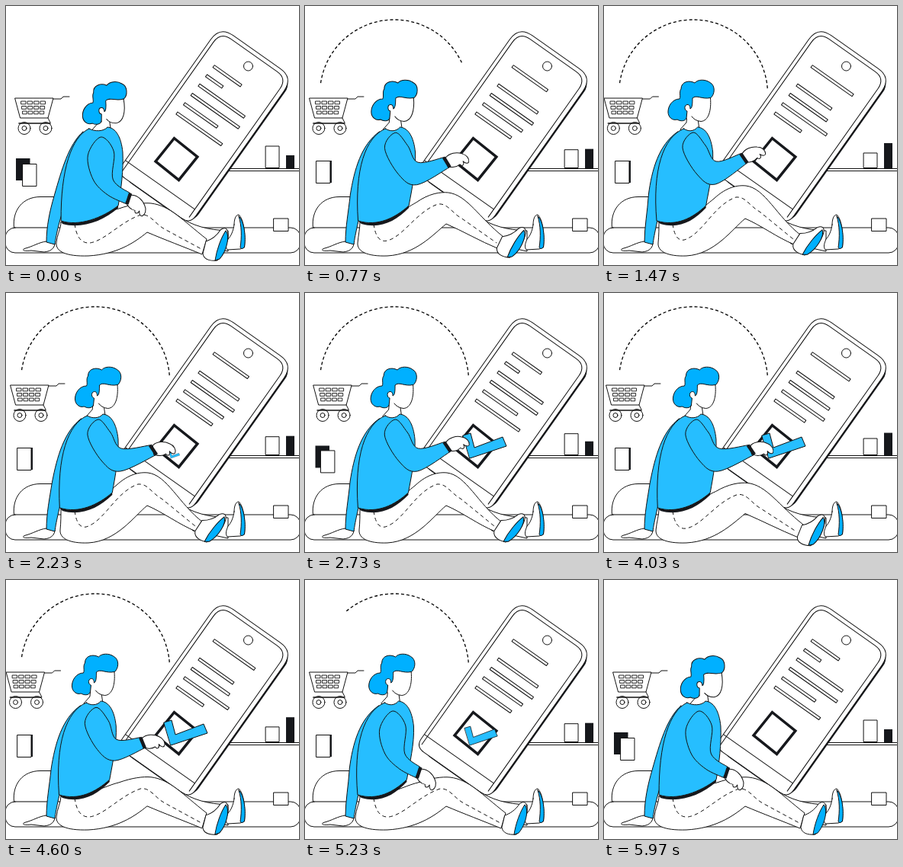
Write an HTML page that moves like this. It is 384 px wide and 340 px high and loops after 6000 ms.

```html
<!DOCTYPE html>
<html lang="en">
<head>
<meta charset="utf-8">
<title>Checklist on a phone</title>
<style>
  html, body { margin: 0; width: 100%; height: 100%; overflow: hidden; background: #fff; }
  svg { display: block; width: 384px; height: 340px; }
  .ln { fill: #fff; stroke: #111; stroke-width: 1; stroke-linejoin: round; stroke-linecap: round; }
  .open { fill: none; }
  .shirt { fill: #26beff; }
  .hair { fill: #00b0ff; }
  .dark { fill: #16181c; stroke: none; }
  .dash { fill: none; stroke-dasharray: 5 4; stroke-linecap: butt; }
  #arc { stroke: #000; stroke-width: 1.3; stroke-dasharray: 4 3; }
  #cells rect { stroke-width: .9; }
</style>
</head>
<body>
<svg viewBox="0 0 384 340">
  <path id="arc" class="ln dash"/>

  <g id="cart">
    <path class="ln" d="M0 121H50L43 147H7Z"/>
    <path class="ln open" d="M50 122H60L63 119H71M43 147L46 153"/>
    <g id="cells"></g>
    <g id="wheels"></g>
    <path class="ln open" d="M5 154H46" style="stroke-width:1.6"/>
  </g>

  <rect id="cardBack" class="dark" width="18.5" height="29"/>
  <rect id="cardFront" class="ln" width="18" height="29"/>

  <path class="ln open" d="M290 213.5H384M290 216.5H384"/>
  <rect id="jarLight" class="ln" x="340.5" width="17.5"/>
  <rect id="jarDark" class="dark" x="367" width="11"/>

  <path class="ln" d="M10.5 291C8 268 22 250.5 45 250.5H120V291Z"/>
  <rect class="ln" x="-1" y="291" width="387" height="33" rx="13"/>
  <rect class="ln" x="351" y="279" width="19" height="16.5"/>

  <g transform="rotate(35.2)">
    <rect class="dark" x="252" y="-137" width="112" height="233" rx="18"/>
    <path class="ln" d="M265.600-140H341Q362-140 362-119V82Q362 95 349 95H257.600Q244.600 95 244.600 82V-119Q244.600-140 265.600-140Z"/>
    <path class="ln open" d="M249.500 88V-118Q249.500-134.500 266-134.500H340Q356-134.500 356-118V88M245 75.400H356"/>
    <g id="bars"></g>
    <rect x="279" y="16" width="39" height="39" transform="rotate(3.5 298.5 35.5)" fill="#fff" stroke="#16181c" stroke-width="3.500"/>
  </g>
  <circle class="ln" cx="317.5" cy="79" r="6"/>
  <path id="tick" class="ln shirt" stroke-width=".8" d="M-9-30L1-33L6-14L43-28L48-16L0 0Z"/>

  <path class="ln" d="M226 276C245 289 265 294 291 295L291 322L245 312Z"/>
  <path class="ln" d="M299 287C299 280 301 274 305 274C311 279 314 297 312.5 317L307 319L290 320C287 316 289 311 291 306C295 302 298 295 299 287Z"/>
  <path class="ln hair" d="M305 276C311 280 315 300 312.500 316C311 319 308 319 307 317C309 304 309 288 305 276Z"/>
  <path id="leg" class="ln"/>
  <path id="seam" class="ln dash"/>
  <g id="foot">
    <path class="ln" d="M258 325C259 332 266 335 277 334C283 328 292 310 291 298C290 291 286 290 281 294C276 302 268 307 262 309Z"/>
    <path class="ln hair" d="M274 334C276 320 282 304 288 295C294 302 289 322 280 332Z"/>
  </g>

  <path class="ln" d="M53 309C43 310 35 316 24 318.500C20 321 25 322 33 321L50 323C60 322 64 317 64 311Z"/>
  <path id="rearArm" class="ln shirt"/>
  <path id="belt" class="dark"/>
  <path id="neck" class="ln" d="M113 142L112 153L104 162C112 168 122 167 129 162L127 148Z"/>
  <path id="torso" class="ln shirt"/>
  <g id="head">
    <path class="ln hair" d="M144.500 121C151 116 151 104 144 100.500C138 96 128 96 124 101C117 97 106 99 106 109C103 113 106 119 104 122C95 122 89 131 89 139C89 146 95 151 101 149C106 152 112 151 113 147L122 138Z"/>
    <path class="ln" d="M113 148L114 138C110 137 110 130 114 129.500C117 129 118 132 118 135C121 134 121 127 121 121C126 116 134 123 144.500 120.500C146 137 142 151 132 151.500C126 151 122 148 120 145"/>
  </g>
  <path id="sleeve" class="ln shirt"/>
  <g id="hand">
    <path class="ln" d="M0-6C6-11 16-10 22-6C28-3 30 3 28 7C26 9 23 7 21 4C22 9 18 11 16 7C10 10 5 8 0 6Z"/>
  </g>
  <path id="cuff" fill="none" stroke="#16181c" stroke-width="4.500"/>
</svg>

<script>
const LOOP = 6000;
const el = id => document.getElementById(id);
const set = (id, attrs) => { for (const k in attrs) el(id).setAttribute(k, attrs[k]); };
const move = (id, x, y, more = '') => set(id, { transform: `translate(${x} ${y}) ${more}` });
const ease = k => (1 - Math.cos(Math.PI * Math.min(1, Math.max(0, k)))) / 2;
const ramp = (t, from, to) => ease((t - from) / (to - from));
const mix = (a, b, k) => a + (b - a) * k;
const wave = (t, period, peak = 0) => Math.cos(2 * Math.PI * (t - peak) / period);

function add(parent, tag, attrs) {
  const node = document.createElementNS('http://www.w3.org/2000/svg', tag);
  node.setAttribute('class', 'ln');
  for (const k in attrs) node.setAttribute(k, attrs[k]);
  return el(parent).appendChild(node);
}

// Smooth curve through points, without the leading move
function curve(pts) {
  return pts.slice(1).map((p, i) => {
    const a = pts[i], before = pts[i - 1] || a, after = pts[i + 2] || p;
    const c1 = [0, 1].map(n => a[n] + (p[n] - before[n]) / 6);
    const c2 = [0, 1].map(n => p[n] - (after[n] - a[n]) / 6);
    return `C${c1} ${c2} ${p}`;
  }).join('');
}

// Lines of text: middle length and swing
const bars = [[55, -11], [0, 26], [64, 9], [68, 8], [62, -9], [57, 15]].map(([mid, swing], i) => ({
  mid, swing, node: add('bars', 'rect', { x: 268 - i * .8, y: -94 + i * 15.6, height: 3.6 })
}));

for (let row = 0; row < 3; row++)
  for (let col = 0; col < 4; col++)
    add('cells', 'rect', { x: 8 + col * 8.5 + row * (1 - col * .5), y: 125 + row * 6.5, width: 6 - row * .4, height: 3.8 });

for (const cx of [12, 40])
  for (const r of [8, 3]) add('wheels', 'circle', { cx, cy: 160.5, r });

function drawProps(t) {
  const c = wave(t, 3000), k = Math.max(0, c);
  move('cart', 6.2 + 5.8 * c, 0);
  set('cardBack', { x: 16.5 - 3.5 * k, y: 203 - 3 * k });
  set('cardFront', { x: 15 + 7 * k, y: 203.5 + 4 * k });
  const light = 188.5 - 4.5 * c, dark = 188 + 8 * c;
  set('jarLight', { y: light, height: 212.5 - light });
  set('jarDark', { y: dark, height: 213 - dark });
  for (const { mid, swing, node } of bars) {
    const w = Math.max(0, mid + swing * c);
    node.setAttribute('width', w);
    node.setAttribute('visibility', w > .5 ? 'visible' : 'hidden');
  }
}

function drawArc(t) {
  const point = k => {
    const a = (188.5 + 168 * k) * Math.PI / 180;
    return `${117 + 97.5 * Math.cos(a)} ${115.5 + 97.5 * Math.sin(a)}`;
  };
  const from = ramp(t, 4900, 5900), to = ramp(t, 0, 1000);
  set('arc', { d: to - from > .002 ? `M${point(from)}A97.5 97.5 0 0 1 ${point(to)}` : '' });
}

function drawTick(t) {
  const s = ramp(t, 2000, 2700) * (1 - ramp(t, 5000, 5700));
  move('tick', 216, 217, `scale(${s})`);
  set('tick', { visibility: s > .01 ? 'visible' : 'hidden' });
}

function drawLegs(q) {
  const kx = mix(190, 186, q), ky = mix(259, 236, q), vy = mix(297, 279, q);
  const ax = mix(263, 258, q), ay = mix(306, 301, q), bx = mix(257, 249, q), by = mix(326, 313, q);
  const hip = 66 + 5 * q;
  set('leg', { d: `M72 284C110 284 130 ${mix(270, 264, q)} ${kx - 42} ${ky + mix(7, 17, q)}
    C${kx - 25} ${ky + 1} ${kx - 10} ${ky - 1} ${kx} ${ky}
    C${kx + 25} ${ky + 3} ${ax - 32} ${ay - 25} ${ax} ${ay}L${bx} ${by}
    C${bx - 22} ${by - 9} 206 ${vy + 9} 185 ${vy}
    C168 ${vy + 14} 145 326 108 328C${hip + 12} 329 ${hip - 1} 322 ${hip} 311C${hip + 1} 300 72 292 72 284Z` });
  set('seam', { d: `M90 286C92 302 98 312 110 ${mix(311, 305, q)}
    C130 ${mix(308, 296, q)} ${kx - 40} ${ky + 24} ${kx - 13} ${ky + 15}
    C${kx} ${ky + 14} ${kx + 5} ${ky + 27} ${kx + 18} ${ky + 34}L${bx - 1} ${by - 7}` });
  move('foot', -q, -q, `rotate(${19 * q} 288 292)`);
}

function drawTorso(d) {
  const neck = 106 + d * .4;
  const hem = y => `C95 ${290 + y} ${120 + d} ${278 + y} ${138 + d * 1.3} ${262 + y}`;
  const left = `${70 + d * .3} 282`;
  set('torso', { d: `M${neck} 161C${80 + d * .8} 172 ${66 + d * .8} 215 ${left}${hem(0)}
    C${142 + d * 1.3} 240 ${147 + d} 215 ${146 + d} 192
    C${144 + d} 172 ${137 + d} 160 ${126 + d} 159C${121 + d} 165 ${112 + d * .6} 165 ${neck} 161Z` });
  set('belt', { d: `M${left}${hem(0)}v3C${120 + d} 283 98 293 74 286Z` });
  set('rearArm', { d: `M${neck - 8} 165C${75 + d} 182 ${66 + d} 215 ${60 + d * .5} 248
    C57 270 53 290 53 310L64 313C66 298 70 282 ${78 + d * .3} 250Z` });
}

function drawArm(lean, reach, tap) {
  const sx = 118 + lean * .9 + 2 * reach, sy = 190 - 6 * reach;
  const wx = mix(153 + lean * 1.1, 182 + 11 * tap, reach), wy = mix(253, 199 + 7 * tap, reach);
  // Offset from the shoulder, at rest and reaching
  const joint = (x0, y0, x1, y1) => [sx + mix(x0, x1, reach), sy + mix(y0, y1, reach)];
  const angle = mix(18, -34, reach), a = angle * Math.PI / 180;
  const wrist = side => [wx + 7.5 * side * Math.sin(a), wy - 7.5 * side * Math.cos(a)];
  const top = wrist(1), low = wrist(-1);
  set('sleeve', { d: `M${low}${curve([
    low,
    joint(9, 58, 29, 50),
    joint(-10, 38, 5, 37),
    joint(-17, 6, -14, 2),
    [sx, sy - 18],
    joint(17, 1, 16, -1),
    joint(16, 38, 30, 20),
    top
  ])}Z` });
  move('hand', wx, wy, `rotate(${angle + mix(20, 6 + 22 * tap, reach)})`);
  set('cuff', { d: `M${top}L${low}` });
}

function draw(t) {
  const back = ramp(t, 0, 800) - ramp(t, 5250, LOOP);
  const reach = ramp(t, 0, 900) - ramp(t, 4350, 5150);
  const lift = ramp(t, 0, 1350) - ramp(t, 3200, 4700);
  const tap = (1 + wave(t, 1900, 2200)) / 2;
  const lean = mix(7, mix(-4, 1, tap), back);
  const hx = lean * 1.5, hy = 3.5 * (1 - back);
  drawProps(t);
  drawArc(t);
  drawTick(t);
  drawLegs(lift);
  drawTorso(lean);
  move('neck', hx * .8, hy * .3);
  move('head', hx, hy, `rotate(${-5 * (1 - back)} 120 130)`);
  drawArm(lean, reach, tap);
}

function frame() {
  draw(performance.now() % LOOP);
  requestAnimationFrame(frame);
}
frame();
</script>
</body>
</html>
```
